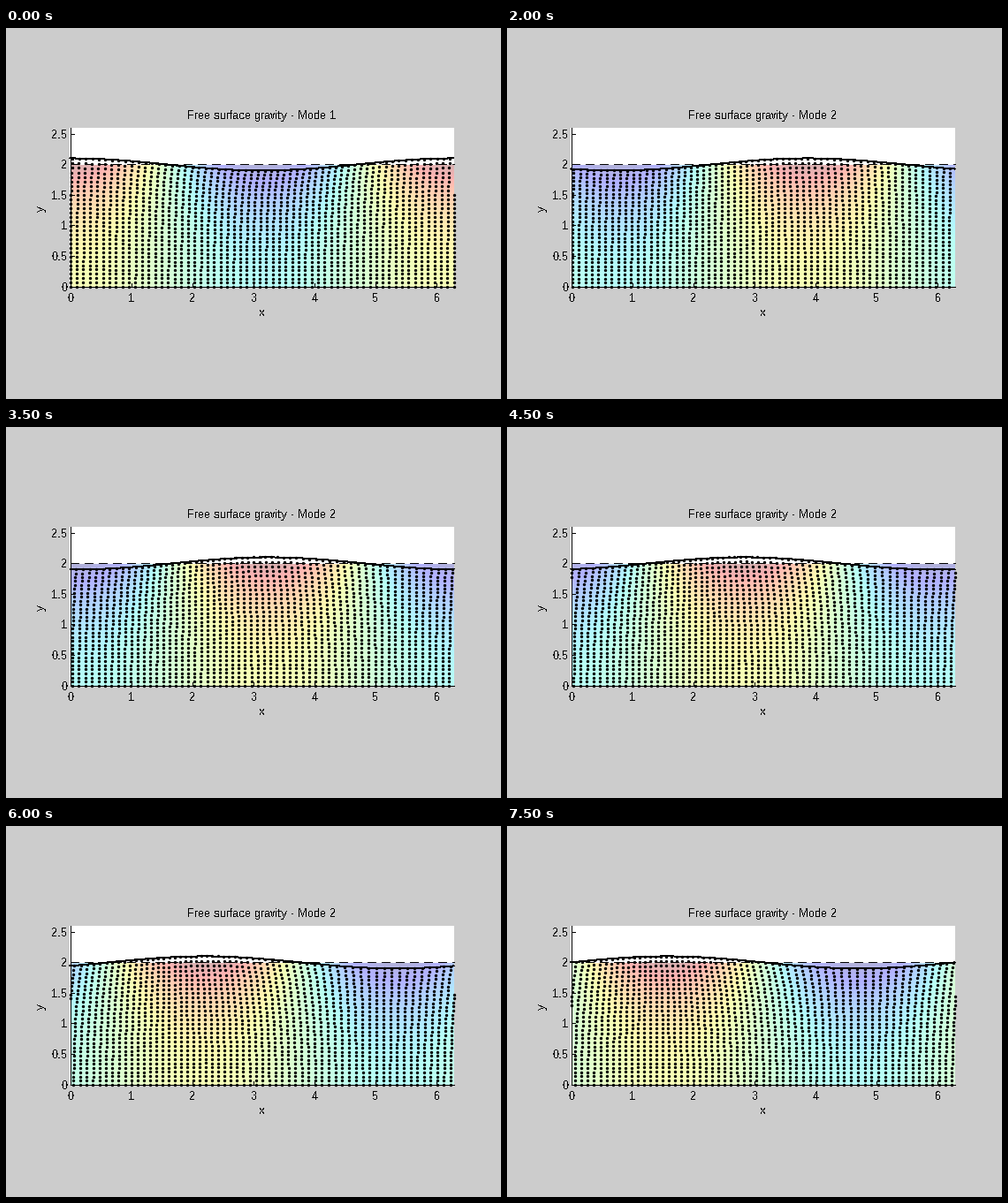
A matplotlib script for the animation above (8 s loop, 560 by 420 pixels).

```python
import numpy as np
import matplotlib as mpl
import matplotlib.pyplot as plt
from matplotlib.animation import FuncAnimation
from matplotlib.patches import Rectangle

W, H, DPI = 560, 420, 100
FRAMES, INTERVAL = 16, 500
PX = 72 / DPI                      # one pixel in points

mpl.rcParams["font.family"] = "Liberation Sans"
mpl.rcParams["text.hinting"] = "native"
mpl.rcParams["text.hinting_factor"] = 1

# plot frame in pixels
X0, Y0, SCALE = 72.5, 292.5, 434 / (2 * np.pi)
X1, YTOP = X0 + 434, Y0 - 2.6 * SCALE

# wave: amplitude, depth, phase advance per frame
AMP, DEPTH, STEP = 0.1, 2.0, 2 * np.pi / 30
SINH = np.sinh(DEPTH)


def to_px(x, y):
    return X0 + SCALE * np.asarray(x), Y0 - SCALE * np.asarray(y)


class Wave:
    """Travelling surface wave; sign +1 moves right, -1 moves left."""

    def __init__(self, sign, start):
        self.sign, self.start = sign, start

    def crest(self, theta):
        return self.start + self.sign * theta

    def surface(self, x, theta):
        return DEPTH + AMP * np.cos(x - self.crest(theta))

    def velocity(self, pos, theta):
        x, y = pos
        arg = x - self.crest(theta)
        return self.sign * AMP / SINH * np.array(
            [np.cosh(y) * np.cos(arg), np.sinh(y) * np.sin(arg)])

    def particles(self, steps):
        """Positions of the fluid particles after 1..steps phase steps."""
        x, y = np.meshgrid(np.arange(-6, 66) * 2 * np.pi / 59,
                           np.linspace(0, DEPTH, 30))
        y = y + AMP * np.sinh(y) / SINH * np.cos(x - self.crest(STEP))
        pos, theta, sub = np.array([x.ravel(), y.ravel()]), STEP, 4
        h = STEP / sub
        path = [pos]
        for _ in range(steps - 1):
            for _ in range(sub):
                k1 = self.velocity(pos, theta)
                k2 = self.velocity(pos + h / 2 * k1, theta + h / 2)
                k3 = self.velocity(pos + h / 2 * k2, theta + h / 2)
                k4 = self.velocity(pos + h * k3, theta + h)
                pos = pos + h / 6 * (k1 + 2 * k2 + 2 * k3 + k4)
                theta += h
            path.append(pos)
        return path


right = Wave(1, 0.0)
left = Wave(-1, 1.5 * np.pi)
right_end = right.particles(30)[-1]
left_path = left.particles(FRAMES - 1)

fig = plt.figure(figsize=(W / DPI, H / DPI), dpi=DPI, facecolor="0.8")
ax = fig.add_axes([0, 0, 1, 1])
ax.set_xlim(0, W)
ax.set_ylim(H, 0)
ax.axis("off")


def line(x, y, z, **kw):
    return ax.plot(x, y, color="k", lw=PX, antialiased=False, zorder=z, **kw)[0]


def label(x, y, s, ha="center", **kw):
    kw.setdefault("va", "baseline")
    return ax.text(x, y, s, ha=ha, fontsize=13 * PX, color="k",
                   antialiased=False, zorder=6, **kw)


ax.add_patch(Rectangle((72, 113), 435, 180, fc="w", lw=0, zorder=0,
                       antialiased=False))

# pressure field, one sample per pixel
gx = (np.arange(434) + 0.5) / SCALE
gy = (np.arange(138) + 0.5)[::-1, None] / SCALE
depth_gain = np.cosh(gy) / np.cosh(DEPTH)
jet = mpl.colormaps["jet"]


def field_rgb(crest):
    p = depth_gain * np.cos(gx - crest)
    return 0.7 + 0.3 * jet(0.5 + 0.5 * p)[..., :3]


field = ax.imshow(field_rgb(0), extent=(73, 507, 293, 155), aspect="auto",
                  interpolation="nearest", zorder=1)
ax.set_xlim(0, W)
ax.set_ylim(H, 0)

rest_y = Y0 - SCALE * DEPTH
line([X0, X1], [rest_y, rest_y], 2, dashes=(10, 6), dash_capstyle="butt")
wave_line = line([], [], 3)
dots, = ax.plot([], [], "o", color="k", ms=3.4 * PX, mew=0, zorder=4)

# axes lines, ticks and labels
line([X0, X0], [YTOP, Y0], 5)
line([X0, X1], [Y0, Y0], 5)
for v in range(7):
    x = X0 + SCALE * v
    line([x, x], [Y0, Y0 - 4], 5)
    label(x + 0.5, 310, str(v))
for v in np.arange(0, 2.6, 0.5):
    y = Y0 - SCALE * v
    line([X0, X0 + 4], [y, y], 5)
    label(69.5, y + 5, f"{v:g}", ha="right")
label(289, 326, "x")
label(39, 204, "y", rotation=90, va="center")
title = label(289, 103, "")

xs = np.linspace(0, 2 * np.pi, 200)


def draw(i):
    if i == 0:
        wave, theta, pos, mode = right, 0.0, right_end, 1
    else:
        wave, theta, pos, mode = left, i * STEP, left_path[i - 1], 2
    title.set_text(f"Free surface gravity - Mode {mode}")
    field.set_data(field_rgb(wave.crest(theta)))
    wave_line.set_data(*to_px(xs, wave.surface(xs, theta)))
    px, py = to_px(*pos)
    inside = (px >= X0 - 0.5) & (px <= X1 + 0.5)
    dots.set_data(np.floor(px[inside]) + 0.5, np.floor(py[inside]) + 0.5)
    return field, wave_line, dots, title


anim = FuncAnimation(fig, draw, frames=FRAMES, interval=INTERVAL,
                     repeat=True, repeat_delay=0, blit=False)
plt.show()
```
